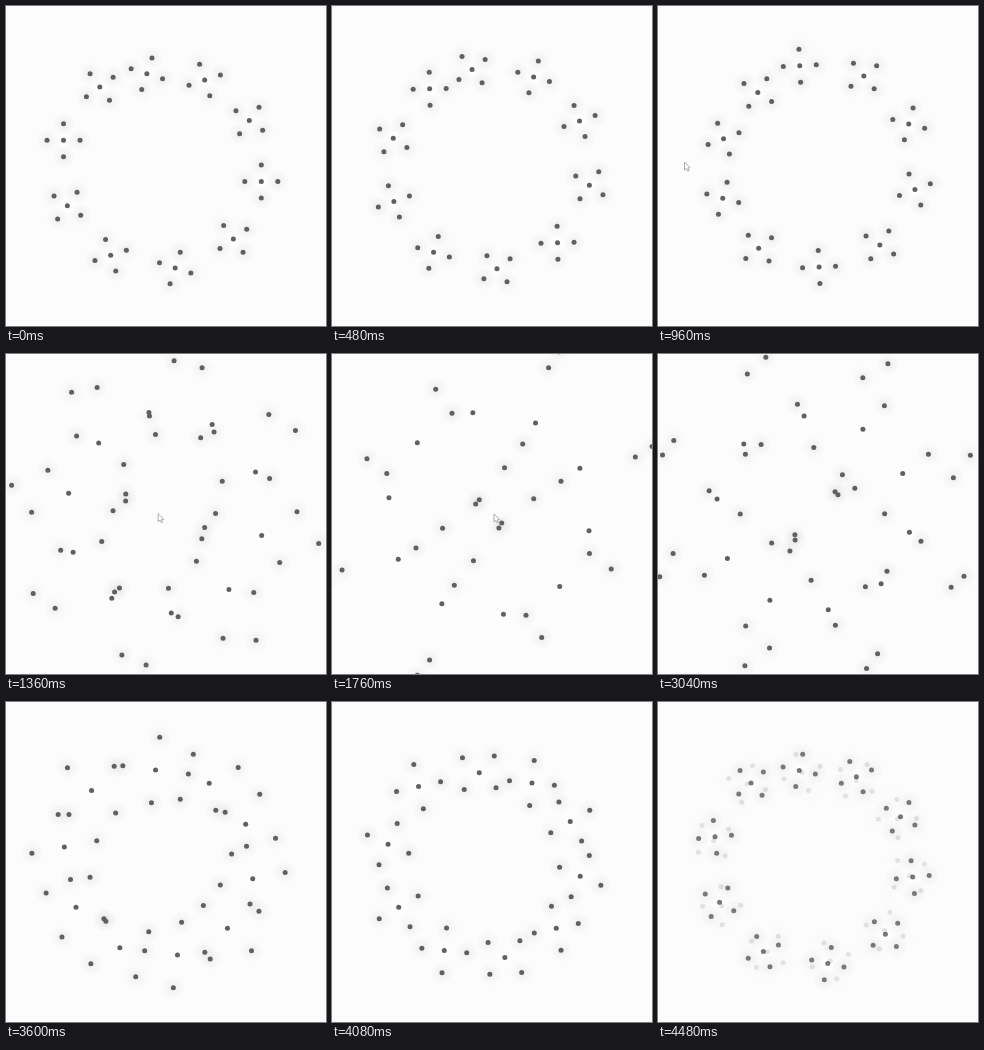
These frames come from a looping animation (320x320 px, 4.56 s). An HTML page with a canvas:

```html
<!DOCTYPE html>
<html>
<head>
<meta charset="utf-8">
<style>
  html, body { margin: 0; width: 100%; height: 100%; overflow: hidden; background: #fcfcfc; }
  canvas { position: absolute; left: 0; top: 0; width: 320px; height: 320px; }
</style>
</head>
<body>
<canvas id="base" width="320" height="320"></canvas>
<canvas id="blend" width="320" height="320"></canvas>
<script>
const LOOP = 4560, STEP = 80, FADE = 4080;
const ENTER = 1185, LEAVE = 2676;
const ARROW = new Path2D('M0 0V8L1.9 6.3 3.2 9 4.5 8.4 3.3 5.8 5.6 5.6Z');

const clamp = x => Math.min(1, Math.max(0, x));
const smooth = x => (x = clamp(x), x * x * (3 - 2 * x));

// The point (x, y) turned about the origin.
function turn(x, y, deg) {
  const a = deg * Math.PI / 180, c = Math.cos(a), s = Math.sin(a);
  return [x * c - y * s, x * s + y * c];
}

// 0 = clusters closed, 1 = fully open; opens while the pointer is inside.
function openness(t) {
  if (t < ENTER) return 0;
  if (t < LEAVE) return 1 - Math.exp((ENTER - t) / 407);
  return 0.98 * Math.exp((LEAVE - t) / 476);
}

function disc(g, x, y, r, fill) {
  g.fillStyle = fill;
  g.beginPath();
  g.arc(x, y, r, 0, 2 * Math.PI);
  g.fill();
}

function glow(g, x, y, r, rgb, alpha) {
  const fill = g.createRadialGradient(x, y, 0, x, y, r);
  fill.addColorStop(0, `rgba(${rgb},${alpha})`);
  fill.addColorStop(0.5, `rgba(${rgb},${alpha * 0.4})`);
  fill.addColorStop(1, `rgba(${rgb},0)`);
  disc(g, x, y, r, fill);
}

function pointer(g, t) {
  if (t < 800 || t > 2760) return;
  const go = smooth((t - 800) / 660), out = smooth((t - 2480) / 280);
  g.save();
  g.translate(3 + 159 * go - 175 * out, 155.5 + 4.5 * go);
  g.fillStyle = '#fff';
  g.fill(ARROW);
  g.strokeStyle = '#9a9a9a';
  g.lineWidth = 0.8;
  g.stroke(ARROW);
  g.restore();
}

function draw(g, t) {
  g.fillStyle = '#fcfcfc';
  g.fillRect(0, 0, 320, 320);
  const open = openness(t), reach = 16.5 + 117.5 * open;
  const offset = 7.2 * (1 - open) ** 1.5;
  const hubs = [], moons = [];
  for (let k = 0; k < 10; k++) {
    // Each cluster turns once in 5 s about a pivot on the ring, a quarter second after the next.
    const axis = 36 * k - 108, spin = 0.072 * t + 18 * k - 54;
    const [px, py] = turn(93.8 + 8.7 * open, 20.7 - 6.2 * open, axis);
    const [ox, oy] = turn(offset, 0, axis + spin - 46);
    const x = 156.5 + px + ox, y = 160 + py + oy;
    hubs.push([x, y]);
    for (let m = 0; m < 4; m++) {
      const [mx, my] = turn(reach, 0, axis + spin + 90 * m);
      moons.push([x + mx, y + my]);
    }
  }
  for (const [x, y] of moons) glow(g, x, y, 12, '0,0,0', 0.06);
  for (const [x, y] of hubs) glow(g, x, y, 9, '255,255,255', 0.8);
  for (const [x, y] of [...moons, ...hubs]) disc(g, x, y, 2.5, '#606060');
  pointer(g, t);
}

const blend = document.getElementById('blend');
const baseCtx = document.getElementById('base').getContext('2d');
const blendCtx = blend.getContext('2d');
const start = performance.now();

function frame() {
  const t = Math.floor((performance.now() - start) % LOOP / STEP) * STEP;
  // The end of the loop dissolves into the run-up to its beginning.
  const mix = clamp((t - FADE) / (LOOP - FADE));
  draw(baseCtx, t);
  if (mix) draw(blendCtx, t - LOOP);
  blend.style.opacity = mix;
  requestAnimationFrame(frame);
}
frame();
</script>
</body>
</html>
```
